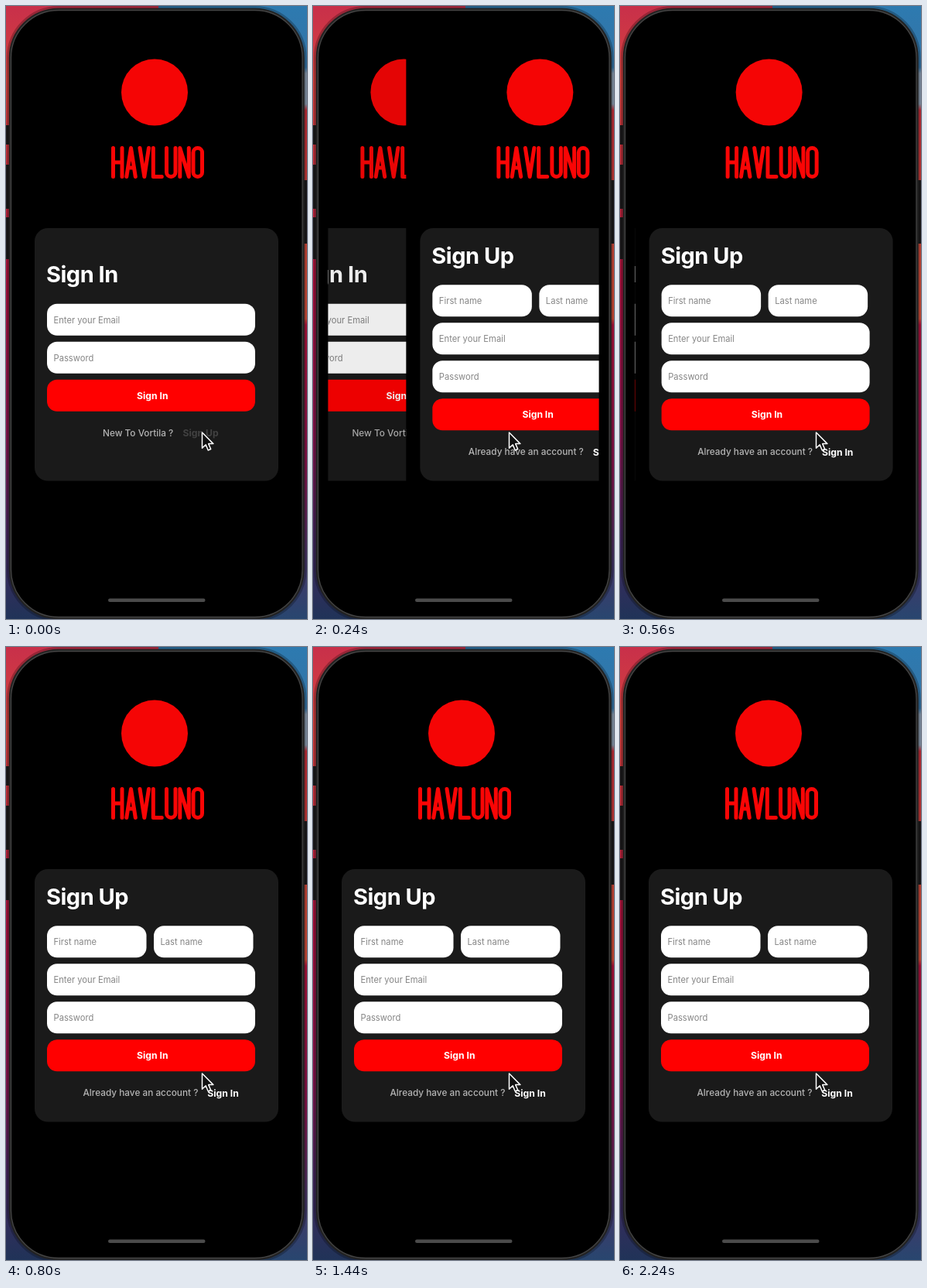
Write an HTML page that moves like this. It is 389 px wide and 792 px high and loops after 2.32 s.

```html
<!DOCTYPE html>
<html lang="en">
<head>
<meta charset="utf-8">
<title>Sign in to sign up transition</title>
<style>
  html, body { margin: 0; width: 100%; height: 100%; overflow: hidden; background: #000; }
  svg { display: block; width: 389px; height: 792px; }
  text { font-family: Inter, "Liberation Sans", sans-serif; }
  .title { font-size: 29px; font-weight: 700; letter-spacing: -.5px; fill: #fff; }
  .field { fill: #fff; }
  .hint { font-size: 11.2px; fill: #858585; }
  .button { fill: #f00; }
  .label { font-size: 12.2px; font-weight: 700; fill: #fff; text-anchor: middle; }
  .note { font-size: 11.8px; font-weight: 500; fill: #b4b4b4; }
  .link { font-size: 12.2px; font-weight: 700; fill: #fff; }
  .wordmark { fill: none; stroke: #fa0505; stroke-width: 5; stroke-linecap: round; stroke-linejoin: round; }
</style>
</head>
<body>
<svg viewBox="0 0 389 792">
  <defs>
    <linearGradient id="leftWall" x2="0" y2="1">
      <stop offset="0" stop-color="#c8304a"/>
      <stop offset=".12" stop-color="#d5413d"/>
      <stop offset=".3" stop-color="#c32a3c"/>
      <stop offset=".45" stop-color="#ad103f"/>
      <stop offset=".7" stop-color="#8a1450"/>
      <stop offset=".86" stop-color="#46265f"/>
      <stop offset="1" stop-color="#203358"/>
    </linearGradient>
    <linearGradient id="rightWall" x2="0" y2="1">
      <stop offset="0" stop-color="#2d7ab0"/>
      <stop offset=".1" stop-color="#3574a6"/>
      <stop offset=".11" stop-color="#8b9cb0"/>
      <stop offset=".16" stop-color="#8b9cb0"/>
      <stop offset=".17" stop-color="#c9303c"/>
      <stop offset=".4" stop-color="#d54c3c"/>
      <stop offset=".51" stop-color="#d8503a"/>
      <stop offset=".52" stop-color="#b8133f"/>
      <stop offset=".75" stop-color="#8d1550"/>
      <stop offset=".9" stop-color="#463568"/>
      <stop offset="1" stop-color="#28466f"/>
    </linearGradient>
    <clipPath id="screen"><rect x="19.5" y="18" width="350" height="756" rx="46"/></clipPath>
    <g id="brand">
      <circle cx="192" cy="111.5" r="43" fill="#f50505"/>
      <path class="wordmark" role="img" aria-label="HAVLUNO" d="
        M138.5 183.5v37M150 183.5v37M138.5 202h11.5
        M155.8 220.5l5.7-37 5.8 37M157.8 209h7.5
        M173 183.5l5.8 37 5.7-37
        M190.3 183.5v37h11
        M207.5 183.5v31.2a5.75 5.8 0 0 0 11.5 0v-31.2
        M224.8 220.5v-37l11.5 37v-37
        M242 189.3a5.75 5.8 0 0 1 11.5 0v25.4a5.75 5.8 0 0 1-11.5 0z"/>
    </g>
    <rect id="card" x="37" y="287" width="315" height="326.5" rx="17" fill="#1a1a1a"/>
    <rect id="wide" x="53" width="269" height="41" rx="13"/>
    <rect id="half" x="53" width="128.5" height="41" rx="13"/>
  </defs>

  <rect width="197" height="792" fill="url(#leftWall)"/>
  <rect x="197" width="192" height="792" fill="url(#rightWall)"/>
  <path fill="#1c1a1c" d="M0 154h5v25h-5zM0 205h5v57h-5zM0 273h5v54h-5zM384 225h5v82h-5z"/>
  <rect x="5" y="4" width="379.5" height="787" rx="63" fill="none" stroke="#000" stroke-opacity=".25" stroke-width="8"/>
  <rect x="5" y="4" width="379.5" height="787" rx="63" fill="#000" stroke="#222" stroke-width="2.5"/>
  <rect x="6.5" y="5.5" width="376.5" height="784" rx="61.5" fill="none" stroke="#454545" stroke-width="1.3"/>

  <g clip-path="url(#screen)">
    <g id="signIn">
      <use href="#brand"/>
      <use href="#card"/>
      <text class="title" x="52" y="357">Sign In</text>
      <use href="#wide" y="384.7" class="field"/>
      <text class="hint" x="61.5" y="409.5">Enter your Email</text>
      <use href="#wide" y="433.7" class="field"/>
      <text class="hint" x="61.5" y="458.5">Password</text>
      <use href="#wide" y="482.8" class="button"/>
      <text class="label" x="189.3" y="507.5">Sign In</text>
      <text class="note" x="125" y="555.7">New To Vortila ?</text>
      <text class="link" id="upLink" x="228.5" y="556">Sign Up</text>
      <rect id="dim" x="19" width="460" height="792" opacity="0"/>
    </g>
    <g id="signUp">
      <rect x="19" width="351" height="792"/>
      <use href="#brand"/>
      <use href="#card"/>
      <text class="title" x="52" y="333">Sign Up</text>
      <use href="#half" y="360.2" class="field"/>
      <text class="hint" x="61.5" y="384.7">First name</text>
      <use href="#half" x="138" y="360.2" class="field"/>
      <text class="hint" x="199.5" y="384.7">Last name</text>
      <use href="#wide" y="409.2" class="field"/>
      <text class="hint" x="61.5" y="433.7">Enter your Email</text>
      <use href="#wide" y="458.2" class="field"/>
      <text class="hint" x="61.5" y="482.7">Password</text>
      <use href="#wide" y="507.3" class="button"/>
      <text class="label" x="189.3" y="532">Sign In</text>
      <text class="note" x="99.5" y="580.2">Already have an account ?</text>
      <text class="link" x="260.3" y="580.5">Sign In</text>
    </g>
  </g>

  <rect x="132" y="765.5" width="125.5" height="4.5" rx="2.25" fill="#4b4b4b"/>
  <path d="M253.5 551v20.3l4.7-4.5 3 7.2 3.5-1.5-3-6.9h6.2z" fill="#111" stroke="#fff" stroke-width="1.5" stroke-linejoin="round"/>
</svg>
<script>
  const LOOP = 2320, STEP = 80, WIDTH = 350;
  const PUSH_AT = 109, RELEASE_AT = 90, RATE = 19;
  const [signIn, signUp, dim, upLink] =
    ["signIn", "signUp", "dim", "upLink"].map(id => document.getElementById(id));

  // Critically damped spring: share of the way still to go.
  function remaining(ms) {
    const x = RATE * Math.max(0, ms) / 1000;
    return (1 + x) * Math.exp(-x);
  }

  const shift = (node, x) => node.setAttribute("transform", `translate(${x.toFixed(2)} 0)`);

  function draw(now) {
    const t = Math.floor((now % LOOP) / STEP) * STEP;
    const left = remaining(t - PUSH_AT);
    const offset = left * WIDTH;
    const settled = offset < .5;
    const fade = Math.min(1, Math.max(0, (t - RELEASE_AT) / 250));
    shift(signUp, settled ? 0 : offset);
    shift(signIn, -.3 * WIDTH * (1 - left));
    signIn.setAttribute("visibility", settled ? "hidden" : "visible");
    dim.setAttribute("opacity", .1 * (1 - left));
    upLink.setAttribute("opacity", .17 + .83 * fade);
  }

  const start = performance.now();
  function tick() {
    draw(performance.now() - start);
    requestAnimationFrame(tick);
  }
  tick();
</script>
</body>
</html>
```
